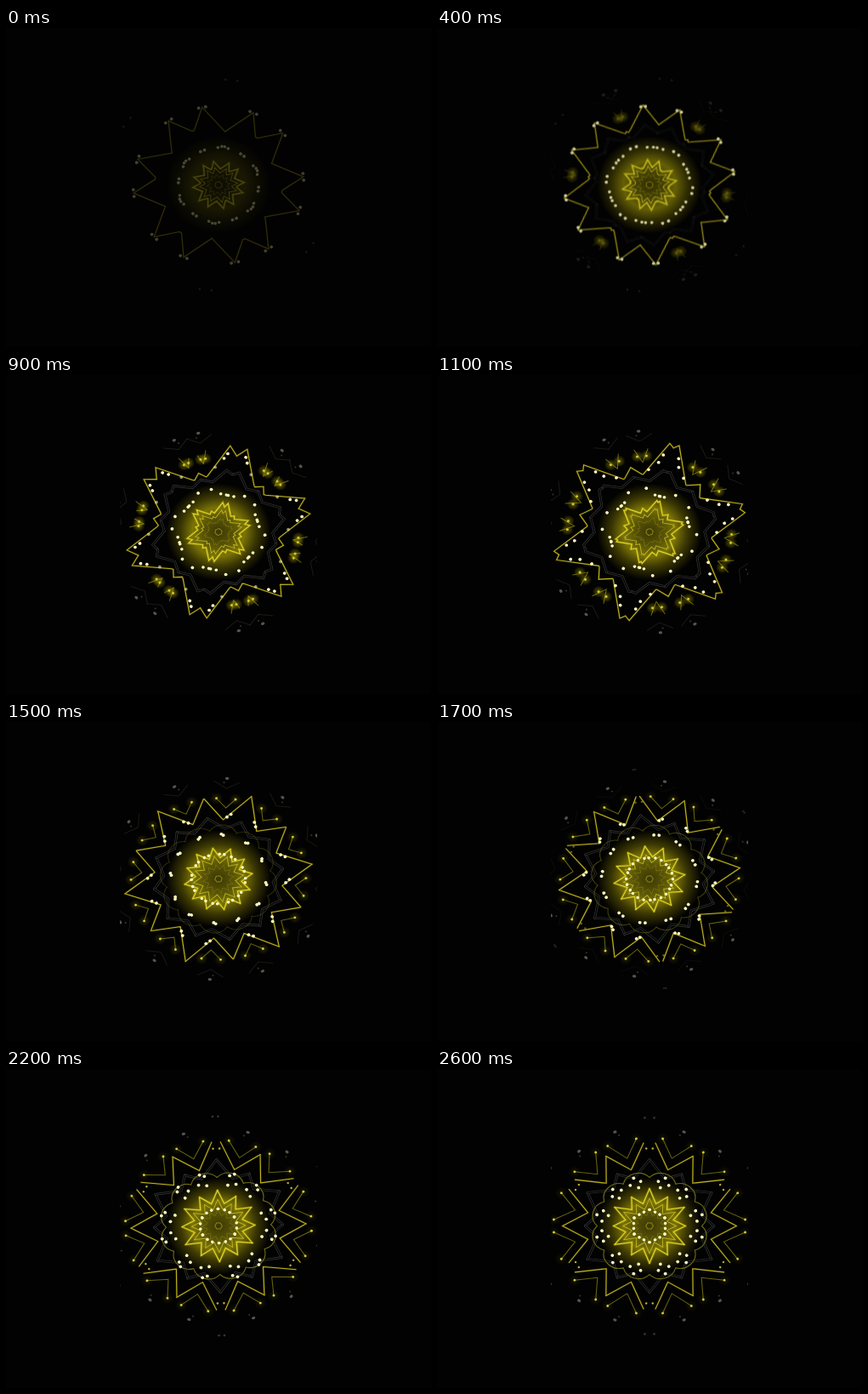
An HTML page without scripts for the animation above (2.7 s loop, 500 by 375 pixels).

```html
<!DOCTYPE html>
<html lang="en">
<head>
<meta charset="utf-8">
<title>Golden mandala</title>
<style>
html, body { margin: 0; width: 100%; height: 100%; overflow: hidden; background: #020202; }
svg { display: block; width: 100%; height: 100%; }
path { fill: none; stroke-linecap: round; stroke-linejoin: miter; }
</style>
</head>
<body>
<svg viewBox="0 0 500 375" preserveAspectRatio="none">
  <defs>
    <clipPath id="window"><rect x="134" y="45" width="232" height="275"/></clipPath>
    <radialGradient id="halo">
      <stop offset="0" stop-color="#3a3704"/>
      <stop offset=".28" stop-color="#575206"/>
      <stop offset=".5" stop-color="#7a7307"/>
      <stop offset=".72" stop-color="#3c3803"/>
      <stop offset="1" stop-color="#3c3803" stop-opacity="0"/>
    </radialGradient>
    <radialGradient id="spark">
      <stop offset="0" stop-color="#c2b800" stop-opacity=".5"/>
      <stop offset="1" stop-color="#c2b800" stop-opacity="0"/>
    </radialGradient>

    <!-- Half-sector lines, from the mirror axis to the 30 degree edge -->
    <path id="zig" d="M0-62.5L28.7-88.4L33.8-61L34.3-60.6L34.8-60.2">
      <animate attributeName="d" begin="-.03s" dur="2.7s" repeatCount="indefinite" keyTimes="0;.259;.407;.556;.704;1"
        values="M0-62.5L28.7-88.4L33.8-61L34.3-60.6L34.8-60.2;
          M0-77L14.9-94.3L27.9-59.8L29.3-56.3L33-57.2;
          M0-102L5.6-106.9L24.4-63.5L25.5-63L38.5-66.7;
          M0-104L2-100.2L19.6-67.2L22-68.4L47.5-82.3;
          M0-96L2-92.4L16.8-65.9L20-68.2L46.7-87.9;
          M0-94.6L2-91.1L15.5-67.2L18-69L42.7-87.6"/>
    </path>
    <path id="star" d="M0-19L8.7-26.6L9.5-17.8L10-17.3">
      <animate attributeName="d" begin="-.03s" dur="2.7s" repeatCount="indefinite" keyTimes="0;.259;.407;.556;.704;1"
        values="M0-19L8.7-26.6L9.5-17.8L10-17.3;
          M0-22L4.8-30.6L9.2-18.9L11-19;
          M0-36L1.7-38L9-22.3L14-24.2;
          M0-37L1-35.1L6.9-24L18-31.2;
          M0-40L1-38L7-26.1L20.3-35.1;
          M0-39L1-37.2L7-26.1L22-38.1"/>
    </path>
    <path id="ghost" d="M0-58L20-66L27-52L29-50">
      <animate attributeName="d" begin="-.03s" dur="2.7s" repeatCount="indefinite" keyTimes="0;.259;.407;.556;.704;1"
        values="M0-58L20-66L27-52L29-50;
          M0-64L11.3-71.1L23.6-53L31-53.7;
          M0-73L3.9-73.9L15.5-58L33-57.2;
          M0-71L3-68.2L14-58L36-62;
          M0-70L3-66.9L13-56.5L39-67.5;
          M0-70L3-66.9L13-56.5L39-67.5"/>
    </path>
    <path id="chev" d="M42-80L41-71L42.5-73.6">
      <animate attributeName="d" begin="-.03s" dur="2.7s" repeatCount="indefinite" keyTimes="0;.259;.407;.556;.704;1"
        values="M42-80L41-71L42.5-73.6;
          M43.6-85.5L39.8-71.7L42.5-73.6;
          M27.8-94L28.7-76.8L41.4-88.8;
          M15.5-93.7L21.7-81.1L34.9-87.8;
          M9.3-98.6L17.8-81.6L37-91.5;
          M7.3-104.7L18.7-80.9L39-96.4"/>
    </path>
    <g id="tip">
      <circle r="7" fill="url(#spark)">
        <animate attributeName="opacity" begin="-.03s" dur="2.7s" repeatCount="indefinite" keyTimes="0;.407;.6;1" values="1;1;.3;.2"/>
      </circle>
      <circle r="1.4" fill="#d0c83a"/>
    </g>

    <g id="half">
      <g>
        <animate attributeName="opacity" begin="-.03s" dur="2.7s" repeatCount="indefinite" keyTimes="0;.074;.259;1" values="0;0;1;1"/>
        <use href="#ghost" stroke="#3a3a38" stroke-width="2.6"/>
        <use href="#ghost" stroke="#040404" stroke-width="1.4"/>
        <use href="#chev" stroke="#67640f" stroke-width="1"/>
      </g>
      <path d="M0-57A17 17 0 0 1 28.5-49.4" stroke="#6c6812" stroke-width="1.1">
        <animate attributeName="opacity" begin="-.03s" dur="2.7s" repeatCount="indefinite" keyTimes="0;.407;.704;.815;1" values="0;0;.7;1;1"/>
      </path>
      <use href="#zig" stroke="#6d6600" stroke-width="2.4" stroke-opacity=".25"/>
      <use href="#zig" stroke="#bfb11d" stroke-width="1.05"/>
      <use href="#star" stroke="#b5aa08" stroke-width="3" stroke-opacity=".3"/>
      <use href="#star" stroke="#ddd22a" stroke-width="1.2"/>
      <use href="#star" transform="scale(.74)" stroke="#b8ae22" stroke-width="1.3"/>
      <use href="#star" transform="scale(.46)" stroke="#77710f" stroke-width="1.6"/>

      <!-- Dots: angle from the axis, then distance from the centre -->
      <g>
        <animate attributeName="opacity" begin="-.03s" dur="2.7s" repeatCount="indefinite" keyTimes="0;.074;.259;1" values="0;0;1;1"/>
        <g>
          <animateTransform attributeName="transform" type="rotate" begin="-.03s" dur="2.7s" repeatCount="indefinite" keyTimes="0;.259;.407;.556;.704;1" values="28;28;17.6;9.4;5.4;4"/>
          <animateTransform attributeName="transform" type="translate" additive="sum" begin="-.03s" dur="2.7s" repeatCount="indefinite" keyTimes="0;.259;.407;.556;.704;1" values="0 -85;0 -85;0 -89;0 -95;0 -99;0 -105"/>
          <use href="#tip"/>
        </g>
        <g>
          <animateTransform attributeName="transform" type="rotate" begin="-.03s" dur="2.7s" repeatCount="indefinite" keyTimes="0;.259;.407;.556;.704;1" values="28;28;23.6;21.7;22;22"/>
          <animateTransform attributeName="transform" type="translate" additive="sum" begin="-.03s" dur="2.7s" repeatCount="indefinite" keyTimes="0;.259;.407;.556;.704;1" values="0 -85;0 -85;0 -89;0 -94.5;0 -98.7;0 -104"/>
          <use href="#tip"/>
        </g>
        <g fill="#55564b">
          <animateTransform attributeName="transform" type="rotate" begin="-.03s" dur="2.7s" repeatCount="indefinite" keyTimes="0;.259;.407;.556;.704;1" values="26.5;26.5;21;16;13;11"/>
          <animateTransform attributeName="transform" type="translate" additive="sum" begin="-.03s" dur="2.7s" repeatCount="indefinite" keyTimes="0;.259;.407;.556;.704;1" values="0 -117;0 -117;0 -119;0 -119;0 -113;0 -117"/>
          <ellipse rx="2.1" ry="1.6"/>
          <circle cx="3" cy="5" r="1" opacity=".6"/>
          <path d="M-14 4L0 12L14 4" stroke="#1a1a18">
            <animate attributeName="opacity" begin="-.03s" dur="2.7s" repeatCount="indefinite" keyTimes="0;.556;.704;1" values="1;1;0;0"/>
          </path>
        </g>
      </g>
      <circle r="1.2" fill="#b5ac3c" transform="rotate(27.8) translate(0 -91)">
        <animate attributeName="opacity" begin="-.03s" dur="2.7s" repeatCount="indefinite" keyTimes="0;.556;.704;1" values="0;0;1;1"/>
      </circle>
      <circle r="1.3" fill="#55564b">
        <animate attributeName="opacity" begin="-.03s" dur="2.7s" repeatCount="indefinite" keyTimes="0;.259;.556;.704;1" values="1;0;0;.6;.6"/>
        <animateTransform attributeName="transform" type="rotate" begin="-.03s" dur="2.7s" repeatCount="indefinite" keyTimes="0;.259;.556;.704;1" values="3;3;29.5;29.5;27.5"/>
        <animateTransform attributeName="transform" type="translate" additive="sum" begin="-.03s" dur="2.7s" repeatCount="indefinite" keyTimes="0;.704;1" values="0 -124;0 -130;0 -127"/>
      </circle>
      <g fill="#fbf8c0">
        <circle r="1.8">
          <animateTransform attributeName="transform" type="rotate" begin="-.03s" dur="2.7s" repeatCount="indefinite" keyTimes="0;.259;.407;.556;.704;1" values="15.5;8;5;10;12;13"/>
          <animateTransform attributeName="transform" type="translate" additive="sum" begin="-.03s" dur="2.7s" repeatCount="indefinite" keyTimes="0;.259;.407;.556;.704;1" values="0 -93;0 -92;0 -93;0 -78;0 -67;0 -58"/>
        </circle>
        <circle r="1.8">
          <animateTransform attributeName="transform" type="rotate" begin="-.03s" dur="2.7s" repeatCount="indefinite" keyTimes="0;.259;.407;.556;.704;1" values="20.5;10;7.5;13;14.5;20"/>
          <animateTransform attributeName="transform" type="translate" additive="sum" begin="-.03s" dur="2.7s" repeatCount="indefinite" keyTimes="0;.259;.407;.556;.704;1" values="0 -93;0 -92;0 -83;0 -74;0 -66;0 -52"/>
        </circle>
        <circle r="1.8">
          <animate attributeName="opacity" begin="-.03s" dur="2.7s" repeatCount="indefinite" keyTimes="0;.259;.407;1" values="0;0;1;1"/>
          <animateTransform attributeName="transform" type="rotate" begin="-.03s" dur="2.7s" repeatCount="indefinite" keyTimes="0;.407;.556;.704;1" values="14;15.5;17;17.5;15"/>
          <animateTransform attributeName="transform" type="translate" additive="sum" begin="-.03s" dur="2.7s" repeatCount="indefinite" keyTimes="0;.407;.556;.704;1" values="0 -82;0 -75;0 -53;0 -51;0 -46"/>
        </circle>
        <circle r="1.7">
          <animateTransform attributeName="transform" type="rotate" begin="-.03s" dur="2.7s" repeatCount="indefinite" keyTimes="0;.259;.407;.556;.704;1" values="2;3;0;8;8;10"/>
          <animateTransform attributeName="transform" type="translate" additive="sum" begin="-.03s" dur="2.7s" repeatCount="indefinite" keyTimes="0;.259;.407;.556;.704;1" values="0 -45.5;0 -44;0 -44.5;0 -30;0 -22;0 -17"/>
        </circle>
        <circle r="1.7">
          <animateTransform attributeName="transform" type="rotate" begin="-.03s" dur="2.7s" repeatCount="indefinite" keyTimes="0;.259;.407;.556;.704;1" values="7;14;6;17;30;30"/>
          <animateTransform attributeName="transform" type="translate" additive="sum" begin="-.03s" dur="2.7s" repeatCount="indefinite" keyTimes="0;.259;.407;.556;.704;1" values="0 -44;0 -44.5;0 -45;0 -30;0 -21;0 -19"/>
        </circle>
        <circle r="1.8">
          <animateTransform attributeName="transform" type="rotate" begin="-.03s" dur="2.7s" repeatCount="indefinite" keyTimes="0;.259;.407;.556;.704;1" values="27;25;19;15;8;6"/>
          <animateTransform attributeName="transform" type="translate" additive="sum" begin="-.03s" dur="2.7s" repeatCount="indefinite" keyTimes="0;.259;.407;.556;.704;1" values="0 -43.5;0 -49.5;0 -51.5;0 -51.5;0 -53;0 -52"/>
        </circle>
      </g>
    </g>
    <g id="sector">
      <use href="#half"/>
      <use href="#half" transform="scale(-1 1)"/>
    </g>
    <g id="pair">
      <use href="#sector"/>
      <use href="#sector" transform="rotate(180)"/>
    </g>
  </defs>

  <rect width="500" height="375" fill="#020202"/>
  <g clip-path="url(#window)">
    <g transform="translate(250 184.5) scale(1.08 1)">
      <circle r="57" fill="url(#halo)">
        <animate attributeName="opacity" begin="-.03s" dur="2.7s" repeatCount="indefinite" keyTimes="0;.074;.185;1" values=".2;.2;1;1"/>
      </circle>
      <g>
        <animate attributeName="opacity" begin="-.03s" dur="2.7s" repeatCount="indefinite" keyTimes="0;.074;.185;1" values=".25;.25;1;1"/>
        <g>
          <animateTransform attributeName="transform" type="rotate" begin="-.03s" dur="2.7s" repeatCount="indefinite" keyTimes="0;.074;.259;.407;.556;.704;.815;.963;1" values="6.5;6.5;10;14.4;20;24.4;28.3;30;30"/>
          <use href="#pair"/>
          <use href="#pair" transform="rotate(60)"/>
          <use href="#pair" transform="rotate(120)"/>
          <path d="M0-4L3.5-2V2L0 4L-3.5 2V-2Z" stroke="#8d8512"/>
        </g>
      </g>
    </g>
  </g>
</svg>
</body>
</html>
```
